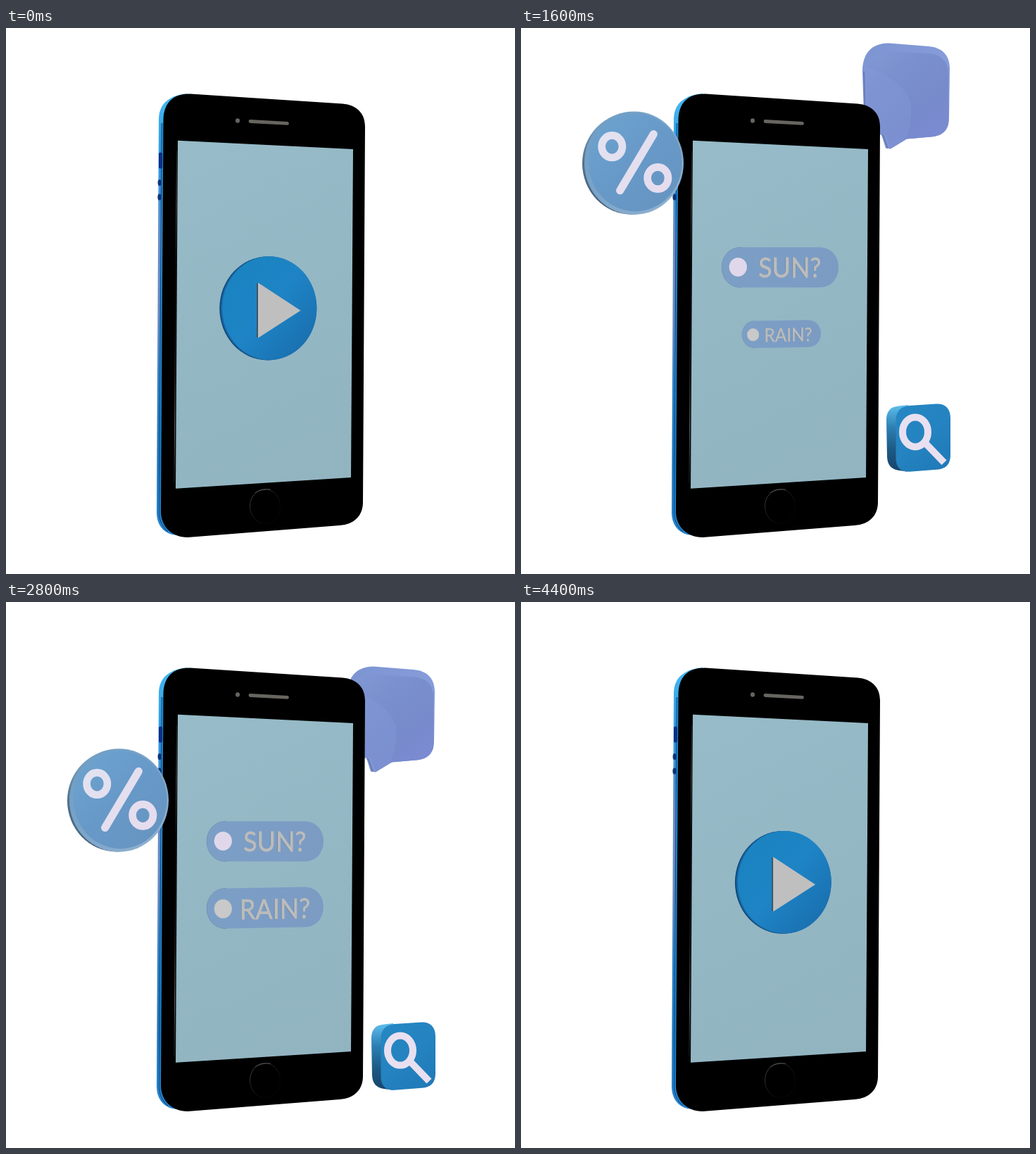
An HTML page with a canvas that plays this animation: 723x775 px, repeating every 4.48 s.

```html
<!DOCTYPE html>
<html lang="en">
<head>
<meta charset="utf-8">
<title>Phone with pop-up icons</title>
<style>
html, body { margin: 0; width: 100%; height: 100%; overflow: hidden; background: #fff; }
canvas { display: block; }
</style>
</head>
<body>
<canvas id="stage" width="723" height="775"></canvas>
<script>
const ctx = document.getElementById('stage').getContext('2d');
const LOOP = 4480, STEP = 80;

// Eased value at time t between [time, value] keys.
function track(t, keys) {
  if (t <= keys[0][0]) return keys[0][1];
  for (let i = 1; i < keys.length; i++) {
    const [t0, a] = keys[i - 1], [t1, b] = keys[i];
    if (t < t1) {
      const p = (t - t0) / (t1 - t0);
      return a + (b - a) * p * p * (3 - 2 * p);
    }
  }
  return keys[keys.length - 1][1];
}

const popup = (t, a, b, c, d) => track(t, [[a, 0], [b, 1], [c, 1], [d, 0]]);
const bob = (t, a, b, c, d, amp) => track(t, [[a, 0], [b, -amp], [c, amp], [d, 0]]);

function gradient(x0, y0, x1, y1, ...stops) {
  const g = ctx.createLinearGradient(x0, y0, x1, y1);
  stops.forEach((c, i) => g.addColorStop(i / (stops.length - 1), c));
  return g;
}

function fill(path, style) {
  ctx.fillStyle = style;
  ctx.fill(typeof path === 'string' ? new Path2D(path) : path);
}

function stroke(path, style, width, cap = 'butt') {
  ctx.strokeStyle = style;
  ctx.lineWidth = width;
  ctx.lineCap = cap;
  ctx.stroke(typeof path === 'string' ? new Path2D(path) : path);
}

function oval(x, y, rx, ry = rx) {
  const p = new Path2D();
  p.ellipse(x, y, rx, ry, 0, 0, Math.PI * 2);
  return p;
}

// Draws a part scaled about (x, y) and shifted down by dy.
function part(x, y, scale, dy, draw) {
  if (scale < 0.004) return;
  ctx.save();
  ctx.translate(x, y + dy);
  ctx.scale(scale, scale);
  ctx.translate(-x, -y);
  draw();
  ctx.restore();
}

function phone() {
  fill('M258 93C235 95 218 105 217 128L216 300L214 688C214 704 222 715 236 719L256 722Z',
    gradient(0, 93, 0, 722, '#45b8f2', '#2f97dd', '#6a8dc4', '#678ac0', '#2b80c4', '#1d76bc', '#2a86d0'));
  stroke('M221 135L220 300L217.5 690Q219 706 230 715', '#0d4f8c', 1.2);
  stroke('M222.5 135L221.5 300L219.5 690', '#1d82cc', 1.8);
  fill('M217 178Q219.500 175 222 178V198Q219 201 217 198Z', '#0b2f86');
  fill(oval(218.2, 219.5, 2.6, 4.5), '#0c3478');
  fill(oval(218, 240, 2.6, 4.5), '#0c3478');

  fill('M262 93.500L478 107.500C498 109 510 121 510 140L507 673C507 692 495 704.500 474 706' +
    'L258 723C236 723 220 708 220 686L223.500 130C224.500 105 238 93 262 93.500Z', '#000');
  stroke('M242.500 175L239 645', gradient(0, 175, 0, 645, '#222', '#555', '#111', '#111', '#333', '#666', '#222'), 1);
  fill('M244 159.700L493 172L490 638L241 653.800Z', gradient(244, 160, 490, 650, '#97bbc8', '#94b7c4', '#92b4c1'));

  fill(oval(329, 131.5, 3, 3.3), '#67655f');
  stroke('M347 132.500L399.500 135.300', '#67655f', 4.8, 'round');
  stroke(oval(368, 679, 21.5, 24.5), gradient(346, 660, 378, 690, '#484848', '#202020', '#060606'), 1);
  stroke('M354 660Q362 654 376 655', '#5a5a5a', 0.9);
}

function playButton() {
  fill(oval(371.3, 398, 68, 73.5), '#0e4678');
  fill(oval(373.2, 397.8, 68.2, 73.6), '#1668a6');
  fill(oval(374.3, 397.6, 67, 73.3), gradient(320, 345, 435, 440, '#1a83c0', '#1e84c5', '#1a70b0'));
  fill('M356 363L358.500 361.500V440L356 439Z', '#3d5468');
  fill('M358 361.500L418.500 401L358 440Z', '#bfbfbf');
}

function percent() {
  const ink = gradient(110, 190, 214, 280, '#e2e2f0', '#e6dcee');
  fill(oval(157, 236, 70, 72.5), gradient(0, 170, 0, 300, '#7fa9ca', '#51708b', '#46627c'));
  fill(oval(160.5, 235.5, 70.5, 73.3), gradient(95, 170, 215, 300, '#6d9dc4', '#7ba4c8', '#8fb1d0'));
  fill(oval(162.3, 234.6, 66.3, 69.6), gradient(100, 170, 220, 300, '#6da3cf', '#6799c8', '#6794c0'));
  stroke(oval(129.3, 212, 14.7, 15.8), ink, 10.6);
  stroke(oval(194.3, 256.8, 14.7, 15.6), ink, 10.6);
  stroke('M188.300 194.500L140.700 274.500', ink, 11.2, 'round');
}

function bubble() {
  const body = 'M485 94C485 70 497 54 522 54L579 58.500C598 60 609 71 609 90L608 160' +
    'C608 177 599 186 582 187L548 190L525 204L518 203L512 184C496 182 487 174 487 158Z';
  fill(body, gradient(490, 60, 600, 190, '#7c95d2', '#879cd9', '#7a8bc9'));
  ctx.save();
  ctx.clip(new Path2D(body));
  fill('M491 98C491 76 502 65 522 65L580 69C597 70 607 80 607 98V190H548L525 204L518 184C502 184 491 174 491 158Z',
    gradient(500, 65, 600, 195, '#7f98d3', '#7a8fcd', '#778acb', '#7c8bd3'));
  fill('M491 88C526 100 548 118 554 140Q556 170 545 191L525 204L512 184Q491 184 491 158Z', 'rgba(132,155,218,.35)');
  stroke('M487 94L489 160Q491 180 515 186L521 204', '#6a80bb', 2.5);
  ctx.restore();
}

function search() {
  fill('M550 564.500L537 566C524 567 519 574 519 586L520 638C520.500 650 526 656 537 657.500L548 659Z',
    gradient(0, 566, 0, 658, '#5cbcea', '#2c7fb3', '#1d5a86', '#17456a'));
  fill('M552 565.500L590 563C603 562.500 610 570 610 583V636C610 649 603 655.500 591 656.300' +
    'L552 659.300C539 660 532.500 653 532.500 640V587C532.500 574 539 566.500 552 565.500Z',
    gradient(535, 565, 608, 657, '#2587c3', '#2483c0', '#2079b7'));
  stroke(oval(560, 603, 18, 21), '#e8e0f0', 10);
  stroke('M573.500 618L601 646.500', '#e8e0f0', 9.8);
}

function pill(label, y, tilt, textX, dotColor) {
  const top = y - 28.5, low = y + 28.5;
  fill(`M313 ${top}L424 ${top - tilt}C460 ${top - tilt} 460 ${low - tilt} 424 ${low - tilt}` +
    `L313 ${low}C276 ${low} 276 ${top} 313 ${top}Z`, gradient(285, 0, 451, 0, '#7c9fc6', '#7b9dc5', '#7c9bc3'));
  stroke(`M313 ${top}C276 ${top} 276 ${low} 313 ${low}`, '#7295b8', 1);
  fill(oval(308.3, y + tilt / 2 - 0.5, 12.6, 13.4), dotColor);
  // The label shares the turned phone's foreshortening.
  ctx.save();
  ctx.translate(textX, y + 14 + tilt / 3);
  ctx.transform(0.92, -tilt / 130, 0, 1, 0, 0);
  ctx.font = '39px Lato, "Open Sans", sans-serif';
  ctx.textAlign = 'center';
  ctx.fillStyle = '#6c86a0';
  ctx.fillText(label, -1.2, 0.5);
  ctx.fillStyle = ctx.strokeStyle = '#bcbcbc';
  ctx.lineWidth = 0.8;
  ctx.fillText(label, 0, 0);
  ctx.strokeText(label, 0, 0);
  ctx.restore();
}

function draw(t) {
  ctx.fillStyle = '#fff';
  ctx.fillRect(0, 0, 723, 775);

  part(547, 122.6, popup(t, 640, 1200, 3130, 3396), 3 + bob(t, 1200, 1720, 2680, 3160, 41), bubble);
  phone();

  const play = track(t, [[0, 1], [600, 0], [4100, 0], [4418, 1]]);
  part(372.5, 398, play, 0, playButton);

  part(374, 341, popup(t, 1180, 1600, 3400, 3720), 0, () => pill('SUN?', 339.8, 0, 381.7, '#e0d8ea'));
  part(374, 435, popup(t, 1340, 1760, 3600, 3930), 0, () => pill('RAIN?', 435, 2, 382, '#c9c9c9'));

  part(159.5, 236, popup(t, 640, 1240, 3171, 3413), bob(t, 1240, 1730, 2690, 3170, 53), percent);
  part(564.5, 611, popup(t, 620, 1100, 3000, 3190), 14.3 + bob(t, 1100, 1580, 2540, 3020, 44), search);
}

function frame() {
  const t = performance.now() % LOOP;
  draw(Math.floor(t / STEP) * STEP);
  requestAnimationFrame(frame);
}
frame();
</script>
</body>
</html>
```
